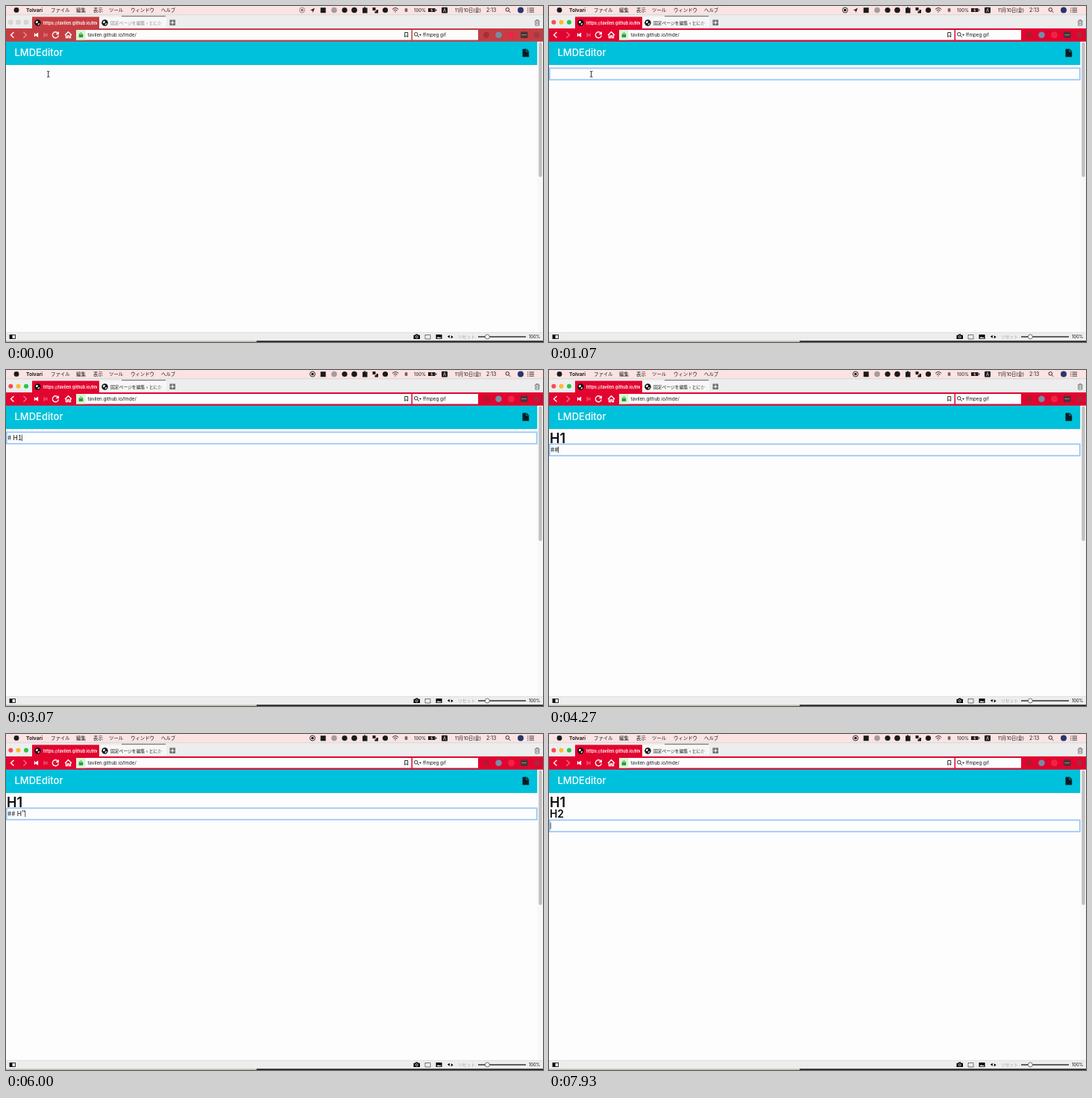
Recreate the animation shown at these times as an HTML page. Size 720 by 450 pixels, loop 8 s.

```html
<!DOCTYPE html>
<html lang="ja">
<head>
<meta charset="utf-8">
<title>LMDEditor</title>
<style>
  html, body { margin: 0; width: 100%; height: 100%; overflow: hidden; background: #fdfdfd; }
  svg { display: block; width: 720px; height: 450px; font-family: Inter, "Noto Sans CJK JP", "Noto Sans CJK", sans-serif; font-size: 6.4px; --chrome: #e2042f; }
  text { white-space: pre; fill: #1a1a1c; }
  .chrome { fill: var(--chrome); }
  .line { fill: none; stroke: #1a1a1c; stroke-width: .9; }
  .white { stroke: #fff; stroke-width: 1.3; }
  .inactive { --chrome: #c53d42; }
  .inactive .light { fill: #d6d6d6; stroke: #c2c2c2; }
  .inactive .dimmed { opacity: .5; }
  #typed { font-family: "Noto Sans CJK JP", "Noto Sans CJK", sans-serif; font-size: 9.3px; }
  #h1, #h2 { font-weight: 600; fill: #0c0c0e; }
</style>
</head>
<body>
<svg id="stage" class="inactive" viewBox="0 0 720 450">
  <defs>
    <clipPath id="tabOne"><path d="M49 14h73v16H49z"/></clipPath>
    <clipPath id="tabTwo"><path d="M139 14h72v16h-72z"/></clipPath>
    <linearGradient id="fade"><stop stop-color="#f7f7f7" stop-opacity="0"/><stop offset="1" stop-color="#f7f7f7"/></linearGradient>
    <g id="globe"><circle r="4.2" fill="#131315"/><path d="M-2.5-1.6q2-2 3 0l-1 2-1.6.2zM.3 1.2l2.4-.8q0 2-2.4 2.6z" fill="#fff"/></g>
    <g id="lens" class="line"><circle cx="-.7" cy="-.7" r="2.3"/><path d="M1 1l2.3 2.3"/></g>
  </defs>

  <rect width="720" height="450" fill="#fdfdfd"/>

  <!-- menu bar -->
  <rect width="720" height="11.5" fill="#fae3e2"/>
  <circle cx="14" cy="5.4" r="3.4" fill="#1a1a1c"/>
  <text x="27" y="8" font-weight="700" font-size="6.6">Tolvari</text>
  <text x="60" y="8">ファイル</text>
  <text x="94" y="8">編集</text>
  <text x="117" y="8">表示</text>
  <text x="138" y="8">ツール</text>
  <text x="167" y="8">ウィンドウ</text>
  <text x="208" y="8">ヘルプ</text>

  <g id="record" class="dimmed"><circle cy="5.5" r="3.5" class="line"/><rect x="-1.5" y="4" width="3" height="3" rx=".5"/></g>
  <path id="arrow" d="M414 2.5l-6 3.2 2.9.5.5 2.8z" fill="#1a1a1c"/>
  <g fill="#1a1a1c">
    <rect x="421.7" y="2.2" width="7" height="7"/>
    <circle cx="440" cy="5.5" r="3.8" fill="#a79a9a"/>
    <circle cx="454" cy="5.5" r="3.6"/>
    <circle cx="467" cy="5.5" r="3.8"/>
    <path d="M478 2.5h2v-1h2v1h2.5v7H478z"/>
    <path d="M491.5 2h4v4h-4zM496.5 5h2.5v4.5h-4.5V7h2z"/>
    <circle cx="508.5" cy="5.5" r="3.6"/>
    <rect x="534.8" y="3.2" width="3.5" height="4.6" fill="#6b6162"/>
    <path d="M566 3h9.500v5H566zM576 4.600h1.300v1.900H576z"/>
    <rect x="584" y="1.700" width="8" height="7.800" rx="1"/>
  </g>
  <path d="M518 4.500q4-4 8.200 0M519.600 6.200q2.500-2.500 5 0M521.300 8q.8-1 1.600 0" class="line"/>
  <path d="M571.200 3.300l-1.500 2.400h2l-1 2" fill="none" stroke="#fae3e2" stroke-width=".8"/>
  <text x="588" y="8" text-anchor="middle" font-size="6" style="fill:#fae3e2">A</text>
  <text x="547" y="8" font-size="6">100%</text>
  <text x="602" y="8" font-size="6.300">11月10日(金)</text>
  <text x="644" y="8" font-size="6.900">2:13</text>
  <use href="#lens" x="673" y="5.500"/>
  <circle cx="690" cy="5.500" r="4" fill="#28366b"/>
  <path d="M699 3h1.200M701.500 3h6.500M699 5.500h1.200M701.500 5.500h6.500M699 8h1.200M701.500 8h6.500" class="line"/>

  <!-- tabs -->
  <rect y="11.500" width="720" height="19" fill="#ededed"/>
  <path d="M0 11.700h720" stroke="#c9c3c3" stroke-width=".6"/>
  <g stroke-width=".5">
    <circle class="light" cx="6.300" cy="21.700" r="3" fill="#fb4a4c"/>
    <circle class="light" cx="16.500" cy="21.700" r="3" fill="#fdb92f"/>
    <circle class="light" cx="27" cy="21.700" r="3" fill="#2bc443"/>
  </g>
  <rect x="35" y="14.500" width="90" height="16" class="chrome"/>
  <use href="#globe" x="42.500" y="22.500"/>
  <text x="50" y="24.600" font-size="5.500" font-weight="600" clip-path="url(#tabOne)" style="fill:#fff">https://tavilen.github.io/lmde/</text>
  <rect x="125" y="14.500" width="90" height="15.500" fill="#f7f7f7"/>
  <path d="M155 13.700h59" stroke="#7b7b7b" stroke-width="1.200"/>
  <use href="#globe" x="132.500" y="22.500"/>
  <text class="dimmed" x="140" y="24.600" font-size="5.800" clip-path="url(#tabTwo)">固定ページを編集 ‹ とにかく</text>
  <rect x="200" y="16" width="14" height="13" fill="url(#fade)"/>
  <rect x="219.500" y="18.500" width="7.500" height="7.500" fill="#707070"/>
  <path d="M220.700 22.250h5.100M223.250 19.700v5.100" stroke="#fff" stroke-width="1"/>
  <path d="M709 20h6.500M711 20v-1.300h2.500V20M709.800 20v6h5v-6M711.300 21.500v3M713.300 21.500v3" class="line" style="stroke:#707070"/>

  <!-- address row -->
  <rect y="30" width="720" height="18" class="chrome"/>
  <path d="M10.500 35l-4 3.700 4 3.700" class="line white"/>
  <path d="M23.500 35l4 3.700-4 3.700" class="line white" opacity=".45"/>
  <path d="M38.500 36.500v4.500M42.500 36.700l-3 2 3 2z" class="line white" style="fill:#fff"/>
  <path d="M51 36.700l3 2-3 2zM55 36.500v4.500" class="line white" opacity=".3"/>
  <path d="M69.500 36.300a4 4 0 1 0 .8 3M70.300 34.500v3h-3" class="line white"/>
  <path d="M79 39l4.500-4.300L88 39M80.500 38.500v4h2v-2.700h2v2.700h2v-4" class="line white"/>
  <rect x="94" y="32" width="449.500" height="13.500" fill="#fdfdfd"/>
  <rect x="94" y="32" width="12.500" height="13.500" fill="#dcf3d8"/>
  <path d="M98.800 38.500v-1.400q1.700-2.600 3.400 0v1.400" fill="none" stroke="#28a132"/>
  <rect x="97.700" y="38" width="5.600" height="4" fill="#28a132"/>
  <text x="109.500" y="41" font-size="6.200">tavilen.github.io/lmde/</text>
  <path d="M534.700 35.500h4v6l-2-1.700-2 1.700z" class="line"/>
  <rect x="545" y="32" width="88" height="13.500" fill="#fdfdfd"/>
  <use href="#lens" x="550.500" y="38.500"/>
  <path d="M554 38h3l-1.500 1.700z"/>
  <text x="559" y="41" font-size="6.300">ffmpeg gif</text>
  <circle cx="644" cy="38.700" r="4" fill="#8c2932" opacity=".6"/>
  <circle cx="660.500" cy="38.700" r="4.300" fill="#718fa8"/>
  <circle cx="677.500" cy="38.700" r="4.500" fill="#ef2444"/>
  <rect x="690" y="34.500" width="9.500" height="8.500" rx="1" fill="#4b3437"/>
  <path d="M691.800 38.700h6" stroke="#fff" stroke-width="1" stroke-dasharray="1 1.300"/>
  <circle cx="711.500" cy="38.700" r="4" fill="#8d3a42" opacity=".6"/>

  <!-- page -->
  <rect y="47.700" width="712.500" height="31.300" fill="#00c1db"/>
  <text x="11.500" y="67.400" font-size="13" font-weight="500" style="fill:#fff">LMDEditor</text>
  <path d="M693.500 57.500h4.700l3 3v7.700h-8.700v-9.700q0-1 1-1z" fill="#071e24"/>
  <path d="M697.700 58v3h3" fill="none" stroke="#00c1db" stroke-width=".7"/>
  <rect x="712.500" y="47.700" width="7.500" height="389.500" fill="#f8f8f8"/>
  <rect x="714.300" y="48.500" width="4.400" height="180.500" rx="2.200" fill="#bfbfbf"/>

  <text id="h1" x="1" y="97.600" font-size="18">H1</text>
  <text id="h2" x="1" y="112" font-size="13.800">H2</text>
  <g id="field">
    <rect x=".8" y="1" width="711" height="15.400" fill="#fdfdfd" stroke="#96c6fa" stroke-width="1.700"/>
    <text id="typed" x="2" y="11.700"></text>
    <path id="caret" d="M0 4.300v8.500" stroke="#222" stroke-width=".8"/>
  </g>
  <path id="pointer" d="M55 87.300q1.700 0 1.700 1.200 0-1.200 1.700-1.200M56.700 88.300v6M55 95.300q1.700 0 1.700-1.200 0 1.200 1.700 1.200" class="line"/>

  <!-- status bar -->
  <rect y="437.300" width="720" height="11" fill="#ededed"/>
  <path d="M0 437.300h720" stroke="#cfcfcf" stroke-width=".6"/>
  <rect y="448.300" width="336" height="1.700" fill="#c4bfb4"/>
  <rect x="336" y="448.300" width="384" height="1.700" fill="#26221f"/>
  <rect x="5" y="440.500" width="7.500" height="5" class="line"/>
  <path d="M5 440.500h3.500v5H5z"/>
  <path d="M546.500 440.700h2l1-1.200h2.500l1 1.200h2v5.300h-8.500z"/>
  <circle cx="550.700" cy="443.200" r="1.500" class="line" style="stroke:#ededed"/>
  <rect x="562" y="440.500" width="7" height="5.500" class="line" stroke-dasharray="1.300 .8"/>
  <path d="M576.500 440h8v6h-8z"/>
  <path d="M577.300 445.200l2-2.500 1.500 1.500 1.300-1 1.700 2z" fill="#ededed"/>
  <path d="M594.800 440.700l-3 2 3 2zM596.700 441.300l3 2-3 2z"/>
  <text x="606" y="445.300" font-size="5.750" style="fill:#a5a5a5">リセット</text>
  <path d="M633 443h64" stroke="#323232" stroke-width="1.300"/>
  <circle cx="645.300" cy="443" r="3" fill="#fdfdfd" stroke="#505050" stroke-width=".8"/>
  <text x="701" y="445.300" font-size="5.700">100%</text>
</svg>
<script>
const LOOP = 8000;
const FOCUS = 330;
const RECORD_MOVES = 2100;
const BLINK = 500;
const FIELD_TOPS = [82.3, 98.3, 114.3];

// [start in ms, finished headings, text in the field]
const STEPS = [
  [FOCUS, 0, ''],
  [1870, 0, '#'], [2130, 0, '# '], [2470, 0, '# H'], [2730, 0, '# H1'],
  [3470, 1, ''],
  [3870, 1, '#'], [4130, 1, '##'], [4530, 1, '## '], [5200, 1, '## H'],
  [5730, 1, '## H"'], [6130, 1, '## H'], [6330, 1, '## H2'],
  [6600, 2, '']
];

const el = Object.fromEntries([...document.querySelectorAll('[id]')].map(node => [node.id, node]));
const show = (node, on) => { node.style.display = on ? 'inline' : 'none'; };
const move = (node, x, y) => node.setAttribute('transform', `translate(${x} ${y})`);

function render(t) {
  const focused = t >= FOCUS;
  const [start, headings, text] = STEPS.findLast(step => step[0] <= t) || [0, 0, ''];
  const recordMoved = t >= RECORD_MOVES;

  el.stage.classList.toggle('inactive', !focused);
  move(el.record, recordMoved ? 411 : 397, 0);
  show(el.arrow, !recordMoved);
  show(el.pointer, t < STEPS[1][0]);
  show(el.h1, headings > 0);
  show(el.h2, headings > 1);
  show(el.field, focused);
  move(el.field, 0, FIELD_TOPS[headings]);

  if (el.typed.textContent !== text) el.typed.textContent = text;
  show(el.caret, (t - start) % (2 * BLINK) < BLINK);
  move(el.caret, 2.2 + (text ? el.typed.getComputedTextLength() : 0), 0);
}

const origin = performance.now();
function tick() {
  render((performance.now() - origin) % LOOP);
  requestAnimationFrame(tick);
}
tick();
</script>
</body>
</html>
```
